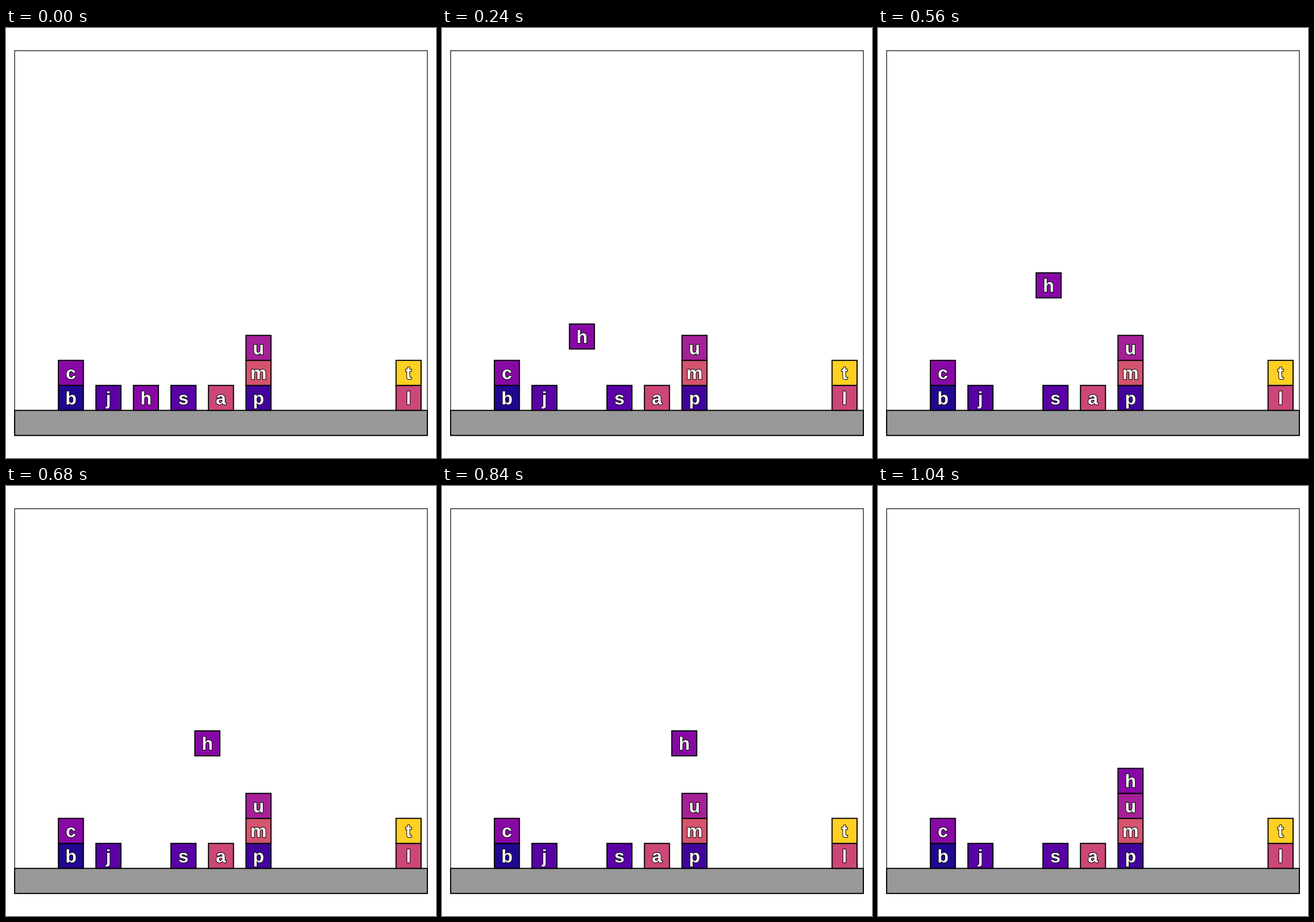
These frames come from a looping animation (748x748 px, 1.08 s). An HTML page:

```html
<!DOCTYPE html>
<html lang="en">
<head>
<meta charset="utf-8">
<title>Stacking blocks</title>
<style>
html, body { margin: 0; width: 100%; height: 100%; overflow: hidden; background: #fff; }
svg { display: block; width: 100vw; height: 100vh; }
rect { stroke: #000; stroke-width: 1.9; }
text {
  font: bold 32px "Liberation Sans", Arial, sans-serif;
  text-anchor: middle;
  fill: #fff;
  stroke: #000;
  stroke-width: 2;
  stroke-linejoin: round;
  paint-order: stroke;
}
</style>
</head>
<body>
<svg id="stage" viewBox="0 0 748 748">
  <rect x="15" y="665.2" width="718" height="43.5" fill="#999"/>
  <rect x="15" y="39.5" width="718" height="669.2" fill="none" style="stroke-width:1.2"/>
</svg>
<script>
const SIZE = 43.51, FLOOR = 665.2, LEFT = 15, STEP = 40, LOOP = 1080;
const stage = document.getElementById("stage");

// letter, column, row, colour
const blocks = [
  ["b", 0, 0, "#220690"], ["c", 0, 1, "#8808a6"], ["j", 1, 0, "#5901a5"],
  ["s", 3, 0, "#5901a5"], ["a", 4, 0, "#cc4778"], ["p", 5, 0, "#42039d"],
  ["m", 5, 1, "#d5546e"], ["u", 5, 2, "#a62098"], ["l", 9, 0, "#cc4778"],
  ["t", 9, 1, "#fdd023"], ["h", 2, 0, "#8808a6"]
];

// Path of the moving block: step, column, row
const path = [[0, 2, 0], [11, 2, 4.5], [22, 5, 4.5], [26, 5, 3]];

function add(parent, tag, attrs) {
  const el = document.createElementNS("http://www.w3.org/2000/svg", tag);
  for (const key in attrs) el.setAttribute(key, attrs[key]);
  return parent.appendChild(el);
}

function place(el, col, row) {
  const x = LEFT + (2.25 + 1.5 * col) * SIZE, y = FLOOR - row * SIZE;
  el.setAttribute("transform", `translate(${x.toFixed(2)} ${y.toFixed(2)})`);
}

function addBlock([letter, col, row, fill]) {
  const g = add(stage, "g", {});
  add(g, "rect", { x: -SIZE / 2, y: -SIZE, width: SIZE, height: SIZE, fill });
  add(g, "text", { x: 0, y: -10.3 }).textContent = letter;
  place(g, col, row);
  return g;
}

const mover = blocks.map(addBlock).pop();

function draw(now) {
  const step = Math.floor((now % LOOP) / STEP);
  const i = Math.max(1, path.findIndex(p => step <= p[0]));
  const [s0, c0, r0] = path[i - 1], [s1, c1, r1] = path[i];
  const k = (step - s0) / (s1 - s0);
  place(mover, c0 + (c1 - c0) * k, r0 + (r1 - r0) * k);
}

let start;
function tick(now) {
  start ??= now;
  draw(now - start);
  requestAnimationFrame(tick);
}
draw(0);
requestAnimationFrame(tick);
</script>
</body>
</html>
```
